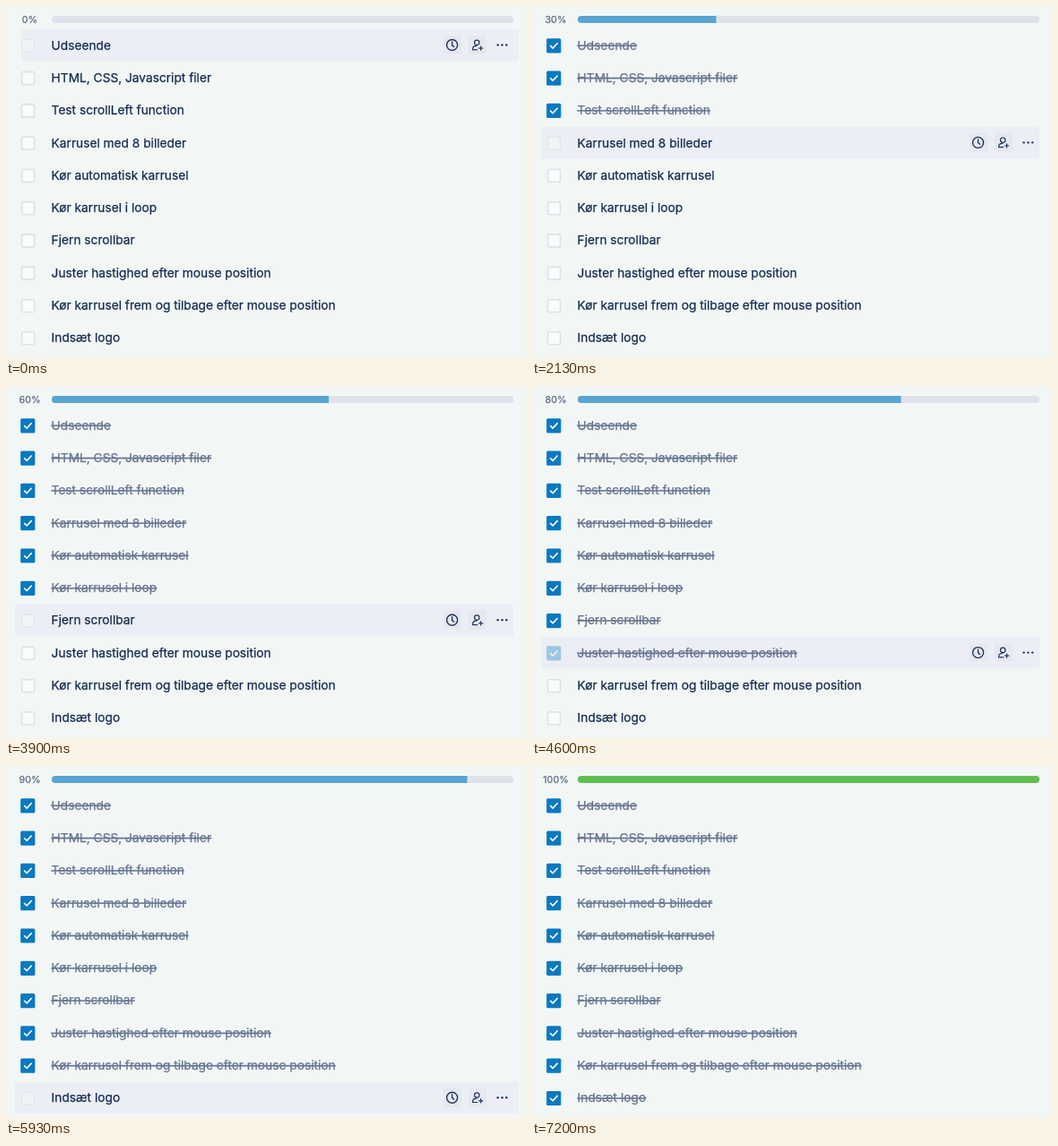
Recreate the animation shown at these times as an HTML page. Size 580 px wide and 393 px high, loop 7660 ms.

```html
<!DOCTYPE html>
<html lang="da">
<head>
<meta charset="utf-8">
<title>Tjekliste</title>
<style>
  html, body { margin: 0; width: 100%; height: 100%; overflow: hidden; background: #f2f7f6; }
  svg { display: block; width: 580px; height: 393px; }
  text { font-family: Inter, "Open Sans", sans-serif; stroke-width: .25; }
  .task { font-size: 13.73px; fill: #172b4d; stroke: #172b4d; }
  .done .task { fill: #67748f; stroke: #67748f; text-decoration: line-through; }
  .percent { font-size: 10.8px; fill: #5e6c84; stroke: #5e6c84; text-anchor: middle; }
  .empty { fill: #fafbfc; stroke: #dfe2e6; stroke-width: 1.6; }
  .hover .empty { fill: #f1f3f7; stroke: #e3e6ec; }
  .done .empty { visibility: hidden; }
  .band { fill: #ebeef5; visibility: hidden; }
  .tools { visibility: hidden; }
  .hover .band, .hover .tools { visibility: visible; }
  .button { fill: #e5e8ee; }
  .line { fill: none; stroke: #22365a; stroke-width: 1.4; stroke-linecap: round; }
  .thin { stroke-width: 1.2; }
  .dot { fill: #22365a; }
  .tick { fill: none; stroke: #fff; stroke-width: 1.6; stroke-linecap: round; stroke-linejoin: round; }
</style>
</head>
<body>
<svg viewBox="0 0 580 393">
  <defs>
    <clipPath id="track"><rect x="51" y="11" width="515" height="8" rx="4"/></clipPath>
    <g id="tools">
      <rect class="button" x="488" y="-11" width="20" height="21" rx="3"/>
      <rect class="button" x="516" y="-11" width="20" height="21" rx="3"/>
      <circle class="line" cx="497.6" cy="-.5" r="6"/>
      <path class="line" d="M497.6 -4v3.8l2 1.6"/>
      <circle class="line thin" cx="525.2" cy="-3.2" r="2.7"/>
      <path class="line thin" d="M525.6 4.8h-5v-1q0-3.2 4.4-3.4M529.6 1v4.2M527.5 3.1h4.2"/>
      <circle class="dot" cx="548.6" cy="-.5" r="1.2"/>
      <circle class="dot" cx="553.4" cy="-.5" r="1.2"/>
      <circle class="dot" cx="558.2" cy="-.5" r="1.2"/>
    </g>
  </defs>
  <text class="percent" id="percent" x="26.5" y="19">0%</text>
  <g clip-path="url(#track)">
    <rect x="51" y="11" width="515" height="8" fill="#dfe2eb"/>
    <rect id="bar" x="51" y="11" width="0" height="8"/>
  </g>
  <g id="list"></g>
</svg>
<script>
const LOOP = 7660, BAR_WIDTH = 515, PITCH = 36.3;
const BAR_DELAY = 100, BAR_TIME = 140, FADE = 300;

// Each task: label, time the pointer arrives, time it is ticked
const tasks = [
  ["Udseende", 0, 240],
  ["HTML, CSS, Javascript filer", 700, 1000],
  ["Test scrollLeft function", 1250, 1700],
  ["Karrusel med 8 billeder", 2000, 2300],
  ["Kør automatisk karrusel", 2440, 2740],
  ["Kør karrusel i loop", 3080, 3500],
  ["Fjern scrollbar", 3800, 4000],
  ["Juster hastighed efter mouse position", 4220, 4500],
  ["Kør karrusel frem og tilbage efter mouse position", 4900, 5440],
  ["Indsæt logo", 5760, 6060]
];
const POINTER_OUT = 6920;

const $ = id => document.getElementById(id);
const clamp = v => Math.max(0, Math.min(1, v));
const last = tasks.length - 1;

$("list").innerHTML = tasks.map(([label], i) => {
  const left = i ? 10 : 17;
  const right = i === 0 || i === last ? 572 : 566;
  return `<g class="row" transform="translate(0 ${(44 + PITCH * i).toFixed(1)})">
    <rect class="band" x="${left}" y="-18" width="${right - left}" height="35.6" rx="2"/>
    <rect class="empty" x="17.6" y="-6.7" width="14" height="14" rx="1.5"/>
    <g class="check" opacity="0">
      <rect x="16.2" y="-7.8" width="16.2" height="16.2" rx="1.5" fill="#0b79bf"/>
      <path class="tick" d="M20.6 .5l2.6 2.6 5-5.4"/>
    </g>
    <text class="task" x="50.6" y="4.6">${label}</text>
    <use class="tools" href="#tools"/>
  </g>`;
}).join("");

const rows = [...document.querySelectorAll(".row")];
const checks = [...document.querySelectorAll(".check")];

function draw(t) {
  let count = 0, filled = 0;
  tasks.forEach(([, enter, tick], i) => {
    const leave = i < last ? tasks[i + 1][1] : POINTER_OUT;
    const done = t >= tick;
    rows[i].classList.toggle("done", done);
    rows[i].classList.toggle("hover", t >= enter && t < leave);
    checks[i].setAttribute("opacity", clamp((t - tick) / FADE));
    count += done;
    filled += clamp((t - tick - BAR_DELAY) / BAR_TIME) ** 1.4;
  });
  $("percent").textContent = count * 10 + "%";
  $("bar").setAttribute("width", BAR_WIDTH * filled / tasks.length);
  $("bar").setAttribute("fill", count === tasks.length ? "#61bd4f" : "#5ba4cf");
}

function frame() {
  draw(performance.now() % LOOP);
  requestAnimationFrame(frame);
}
frame();
</script>
</body>
</html>
```
